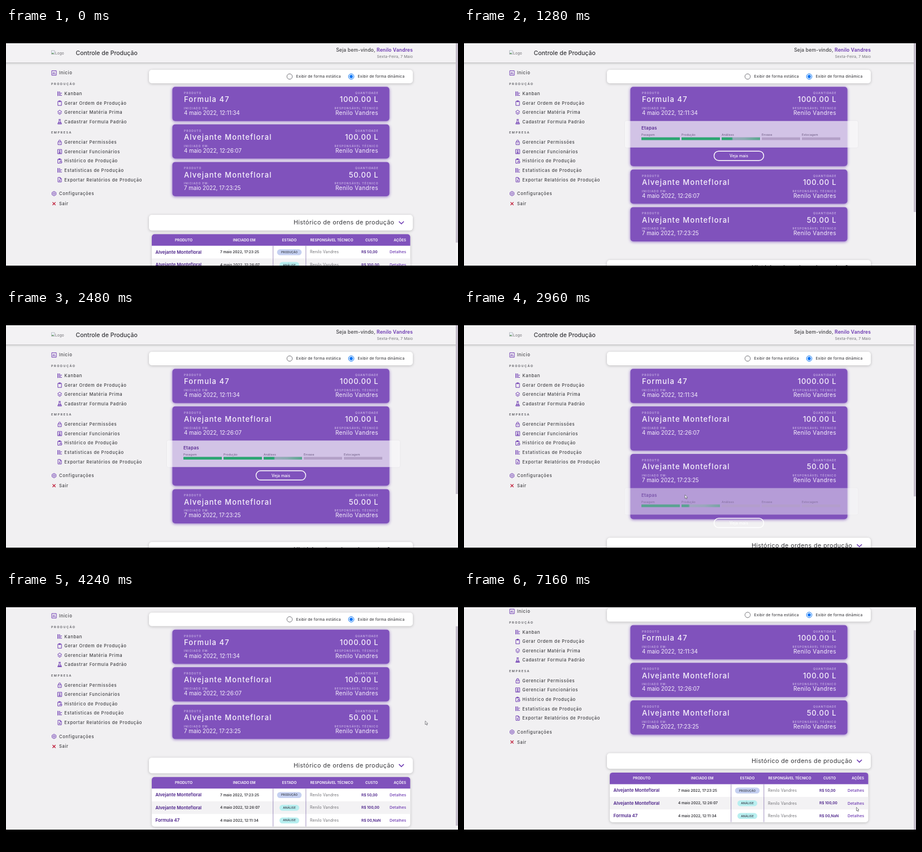
An HTML page with a canvas that plays this animation: 800x450 px, repeating every 7.2 s.

```html
<!DOCTYPE html>
<html lang="pt">
<head>
<meta charset="utf-8">
<title>Controle de Produção</title>
<style>
html, body { margin: 0; width: 100%; height: 100%; overflow: hidden; background: #000; }
canvas { display: block; width: 800px; height: 450px; }
</style>
</head>
<body>
<canvas id="stage" width="800" height="450"></canvas>
<script>
const ctx = document.getElementById('stage').getContext('2d');
const LOOP = 7200, TOP = 27, VIEW = 394, PAGE = 439.4;
const PURPLE = '#8052bc', INK = '#404044', ACCENT = '#6a35b0', BG = '#f1f0f2';
const CARD_H = 60.5, CARD_GAP = 6.1, GROW = 80, FADE = 400;
const PERSON = 'Renilo Vandres', MAIN = 'Alvejante Montefloral', OTHER = 'Formula 47';

// active: index of the step in progress; solid: its finished share
const cards = [
  { name: OTHER, qty: '1000.00 L', date: '4 maio 2022, 12:11:34', active: 2, solid: .26, hover: [[653, 1730]] },
  { name: MAIN, qty: '100.00 L', date: '4 maio 2022, 12:26:07', active: 2, solid: .26, hover: [[150, 610], [1752, 2770]] },
  { name: MAIN, qty: '50.00 L', date: '7 maio 2022, 17:23:25', active: 1, solid: .18, hover: [[2800, 3745]] }
];
const rows = [
  [MAIN, cards[2].date, 'PRODUÇÃO', 'R$ 50,00'],
  [MAIN, cards[1].date, 'ANÁLISE', 'R$ 100,00'],
  [OTHER, cards[0].date, 'ANÁLISE', 'R$ 00,NaN']
];
const steps = ['Pesagem', 'Produção', 'Análises', 'Envase', 'Estocagem'];
const menu = [
  ['home', 'Inicio', 81, 79.7], ['', 'PRODUÇÃO', 80, 99.3],
  ['list', 'Kanban', 91, 116.4], ['clip', 'Gerar Ordem de Produção', 91, 132.9],
  ['layers', 'Gerenciar Matéria Prima', 91, 149.5], ['flask', 'Cadastrar Formula Padrão', 91, 166],
  ['', 'EMPRESA', 80, 185.4],
  ['lock', 'Gerenciar Permissões', 91, 202.4], ['user', 'Gerenciar Funcionários', 91, 219],
  ['history', 'Histórico de Produção', 91, 235.6], ['list', 'Estatisticas de Produção', 91, 252.2],
  ['file', 'Exportar Relatórios de Produção', 91, 268.8],
  ['gear', 'Configurações', 81, 293.4], ['exit', 'Sair', 81, 311.2]
];
const pointer = [
  [2700, 402, 236], [2960, 391, 327.5], [3450, 400, 330], [3840, 742, 224.5],
  [4600, 742, 232], [5150, 500, 352], [5520, 472.5, 374.5], [6000, 480, 372],
  [6750, 702, 366], [7160, 694.5, 381.5]
];

const clamp = v => Math.max(0, Math.min(1, v));

// cubic-bezier(.25, .1, .25, 1)
function ease(p) {
  p = clamp(p);
  let lo = 0, hi = 1, u = p;
  for (let i = 0; i < 20; i++) {
    u = (lo + hi) / 2;
    const x = .75 * u * (1 - u) * (1 - u) + .75 * u * u * (1 - u) + u * u * u;
    if (x < p) lo = u; else hi = u;
  }
  return .3 * u * (1 - u) * (1 - u) + 3 * u * u * (1 - u) + u * u * u;
}

function openness(card, t) {
  let h = 0, on = false;
  for (const [a, b] of card.hover) {
    if (t < a) break;
    on = t < b;
    h = on ? ease((t - a) / FADE) : ease((b - a) / FADE) * (1 - ease((t - b) / FADE));
  }
  return { h, on };
}

function text(str, x, y, size, color, weight = 400, space = 0, align = 'left') {
  ctx.font = `${weight} ${size}px Inter, sans-serif`;
  ctx.letterSpacing = space + 'px';
  ctx.textAlign = align;
  ctx.fillStyle = color;
  ctx.fillText(str, x + (align === 'right' ? space : align === 'center' ? space / 2 : 0), y);
  return ctx.measureText(str).width;
}

function box(x, y, w, h, r, fill, shadow, blur = 4, dy = 1) {
  ctx.save();
  if (shadow) { ctx.shadowColor = shadow; ctx.shadowBlur = blur; ctx.shadowOffsetY = dy; }
  ctx.fillStyle = fill;
  ctx.beginPath();
  ctx.roundRect(x, y, w, h, r);
  ctx.fill();
  ctx.restore();
}

function stroke(path, color, width) {
  ctx.strokeStyle = color;
  ctx.lineWidth = width;
  ctx.stroke(new Path2D(path));
}

const glyphs = {
  home: 'M0 0H8V8H0ZM2.3 6V3.5M4 6V2M5.7 6V4.5',
  list: 'M.5 0V8M1.5 1H5M1.5 3H8M1.5 5H6M1.5 7H8',
  clip: 'M.8 1H7.2V8.3H.8ZM2.7 0H5.3V1.8H2.7Z',
  layers: 'M4 0L7.6 2.7L4 5.4L.4 2.7ZM.4 5L4 7.8L7.6 5',
  flask: 'M2.3 0H5.7M3 0V3L.5 8H7.5L5 3V0M2 5.5H6M1.5 7H6.5',
  lock: 'M1 3.3H7V8.3H1ZM2.2 3.3V2A1.8 1.8 0 0 1 5.8 2V3.3M4 5V6.5',
  user: 'M.4 .2H7.6V7.8H.4ZM2 6.3Q4 4.3 6 6.3ZM2.8 3A1.2 1.2 0 1 0 5.2 3A1.2 1.2 0 1 0 2.8 3',
  history: 'M4 8H.7V1H6.8V3.5M2.5 0H5V1.7H2.5ZM4 6A2 2 0 1 0 8 6A2 2 0 1 0 4 6M6 5V6H7',
  file: 'M1 0H5L7 2V8H1ZM4.7 0V2.3H7M4 3.5V6.5M2.7 5.3L4 6.5L5.3 5.3',
  gear: 'M4 0L7.5 2V6L4 8L.5 6V2ZM2.5 4A1.5 1.5 0 1 0 5.5 4A1.5 1.5 0 1 0 2.5 4',
  exit: 'M1.4 1.4L6.6 6.6M6.6 1.4L1.4 6.6'
};

function icon(name, x, cy) {
  ctx.save();
  ctx.translate(x, cy - 4);
  stroke(glyphs[name], name === 'exit' ? '#c0203c' : ACCENT, name === 'exit' ? 1.3 : .95);
  ctx.restore();
}

function drawHeader() {
  box(-5, 20, 810, 41, 0, '#f3f2f4', 'rgba(0,0,0,.28)', 4, 1);
  box(80, 39.5, 6.5, 7.5, .5, '#b9bcc2');
  box(81, 40.5, 4.5, 5.5, 0, '#eef3fa');
  box(81, 44, 3.5, 2, 0, '#79a878');
  text('Logo', 87, 46.7, 6.6, '#707074');
  text('Controle de Produção', 123.5, 47.8, 10.4, '#343438', 500, .05);
  const w = text(PERSON, 720, 42, 8.5, ACCENT, 600, .2, 'right');
  text('Seja bem-vindo,', 720 - w - 2.3, 42, 8.5, INK, 500, .2, 'right');
  text('Sexta-Feira, 7 Maio', 720, 53, 6.7, '#707076', 400, .13, 'right');
}

function drawMenu() {
  for (const [name, label, x, cy] of menu) {
    if (name) {
      icon(name, x, cy);
      text(label, x + (x > 85 ? 12.3 : 13), cy + 2.7, 7.6, INK, 500, .66);
    } else text(label, x, cy + 2, 5.4, '#58585e', 600, 1.6);
  }
}

function radio(x, label, on) {
  ctx.beginPath();
  ctx.arc(x, 86, 4.8, 0, 7);
  ctx.fillStyle = '#fff';
  ctx.fill();
  ctx.strokeStyle = on ? '#0a75f5' : '#77777c';
  ctx.lineWidth = 1;
  ctx.stroke();
  if (on) {
    ctx.beginPath();
    ctx.arc(x, 86, 2.9, 0, 7);
    ctx.fillStyle = '#0a75f5';
    ctx.fill();
  }
  text(label, x + 11.5, 88.4, 6.5, '#404044', 500, .25);
}

function drawCard(c, y, height) {
  const tag = '#c9b3e6', ink = '#f6f1fc';
  box(294.5, y, 384, height, 5, PURPLE, 'rgba(110,60,180,.75)', 5, 1);
  text('PRODUTO', 315, y + 13, 5, tag, 600, .95);
  text('QUANTIDADE', 658.5, y + 13, 5, tag, 600, .8, 'right');
  text(c.name, 315, y + 27.2, 13, ink, 500, 1.1);
  text(c.qty, 658.5, y + 27.2, 13, ink, 500, .8, 'right');
  text('INICIADO EM:', 315, y + 39.8, 5, tag, 600, .95);
  text('RESPONSÁVEL TÉCNICO', 658.5, y + 39.8, 5, tag, 600, .92, 'right');
  text(c.date, 315, y + 50, 9.7, ink);
  text(PERSON, 658.5, y + 50, 10, ink, 400, .4, 'right');
}

function drawSteps(c, y, h) {
  ctx.save();
  ctx.globalAlpha = clamp(h * 1.3 - .24);
  box(285, y + 60.5, 412, 47, 3, 'rgba(255,255,255,.66)', 'rgba(80,60,110,.1)', 3, 0);
  text('Etapas', 314, y + 75.8, 8, '#592c92', 600, .2);
  steps.forEach((label, i) => {
    const x = 314 + i * 71, by = y + 89.5;
    text(label, x, y + 86.7, 5.2, '#66557c', 400, .15);
    box(x, by, 68, 4.8, 0, '#b3a0c7');
    if (i < c.active) box(x, by, 68, 4.8, 0, '#2ba672');
    if (i === c.active) {
      const g = ctx.createLinearGradient(x, 0, x + 68, 0);
      g.addColorStop(0, '#2ba672');
      g.addColorStop(c.solid, '#2ba672');
      g.addColorStop(c.solid + .04, '#9aaabd');
      g.addColorStop(.6, '#8cacb2');
      g.addColorStop(1, '#55a98c');
      box(x, by, 68, 4.8, 0, g);
    }
  });
  ctx.globalAlpha = clamp(h * 3);
  ctx.beginPath();
  ctx.roundRect(442.5, y + 114, 88, 16.5, 8.2);
  ctx.strokeStyle = '#fff';
  ctx.lineWidth = 1.4;
  ctx.stroke();
  text('Veja mais', 486.5, y + 124.8, 7, '#fff', 500, .1, 'center');
  ctx.restore();
}

function drawHistory(dy) {
  ctx.save();
  ctx.translate(0, dy);
  box(253, 331, 467, 27.7, 5, '#fff', 'rgba(0,0,0,.22)', 5, 1);
  text('Histórico de ordens de produção', 687, 348.3, 10.7, '#38383c', 400, .4, 'right');
  stroke('M695.5 342.7L699.8 347L704.1 342.7', ACCENT, 1.5);

  box(258, 365.3, 457.5, 88, 5, '#fff', 'rgba(0,0,0,.22)', 5, 1);
  box(258, 365.3, 457.5, 20.5, [5, 5, 0, 0], PURPLE);
  const heads = [['PRODUTO', 314.5], ['INICIADO EM', 421.7], ['ESTADO', 501.5],
    ['RESPONSÁVEL TÉCNICO', 576.5], ['CUSTO', 647], ['AÇÕES', 697.2]];
  for (const [label, x] of heads) text(label, x, 377.8, 6.3, '#fff', 600, 0, 'center');

  rows.forEach(([name, date, state, cost], i) => {
    const cy = 397 + i * 22.5, made = state === 'PRODUÇÃO', w = made ? 43.5 : 35;
    if (i === 1) box(258, cy - 11.2, 457.5, 22.4, 0, '#f3f2f4');
    text(name, 264.5, cy + 2.7, 7.9, '#4b2189', 600);
    text(date, 379, cy + 2.3, 6.5, '#37373c', 600);
    box(501.5 - w / 2, cy - 5, w, 10.5, 5.2, made ? '#c5d0f1' : '#b8eff0');
    text(state, 501.5, cy + 2, 4.9, '#414551', 600, .2, 'center');
    text(PERSON, 538, cy + 2.4, 7, '#737378', 400, .12);
    text(cost, 629, cy + 2.3, 6.5, '#4b2189', 600);
    text('Detalhes', 679, cy + 2.4, 6.8, ACCENT, 500, .1);
  });
  stroke('M472.7 386V453M530.8 386V453', '#8a77b0', .8);
  ctx.restore();
}

function drawPointer(t) {
  if (t < pointer[0][0]) return;
  let i = 0;
  while (i < pointer.length - 2 && t > pointer[i + 1][0]) i++;
  const [a, ax, ay] = pointer[i], [b, bx, by] = pointer[i + 1];
  const p = clamp((t - a) / (b - a)), k = p * p * (3 - 2 * p);
  ctx.save();
  ctx.translate(ax + (bx - ax) * k, ay + (by - ay) * k);
  const arrow = new Path2D('M0 0V6.3L1.5 5L2.6 7.3L3.7 6.8L2.7 4.5H4.6Z');
  ctx.fillStyle = '#fff';
  ctx.fill(arrow);
  ctx.strokeStyle = '#55555c';
  ctx.lineWidth = .7;
  ctx.stroke(arrow);
  ctx.restore();
}

function draw(t) {
  const states = cards.map(c => openness(c, t));
  const growth = states.reduce((sum, s) => sum + s.h * GROW, 0);
  const scroll = (PAGE - VIEW) * ease((t - 4020) / 420);

  ctx.fillStyle = '#000';
  ctx.fillRect(0, 0, 800, 450);
  ctx.save();
  ctx.beginPath();
  ctx.rect(0, TOP, 800, VIEW);
  ctx.clip();
  ctx.fillStyle = BG;
  ctx.fillRect(0, TOP, 800, VIEW);

  ctx.save();
  ctx.translate(0, -scroll);
  drawHeader();
  drawMenu();
  box(253, 74, 467, 24, 5, '#fff', 'rgba(0,0,0,.22)', 5, 1);
  radio(502, 'Exibir de forma estática', false);
  radio(611, 'Exibir de forma dinâmica', true);
  drawHistory(growth);
  let y = 104.2;
  cards.forEach((c, i) => {
    const s = states[i], height = CARD_H + s.h * GROW;
    s.y = y;
    drawCard(c, y, height);
    y += height + CARD_GAP;
  });
  cards.forEach((c, i) => {
    if (states[i].on) drawSteps(c, states[i].y, states[i].h);
  });
  ctx.restore();

  const ratio = VIEW / (PAGE + growth);
  box(796, TOP, 4, VIEW, 0, '#f4f3f5');
  box(796, TOP + scroll * ratio, 4, VIEW * ratio, 0, '#c4bdca');
  drawPointer(t);
  ctx.restore();
}

const start = performance.now();
function tick() {
  draw((performance.now() - start) % LOOP);
  requestAnimationFrame(tick);
}
tick();
</script>
</body>
</html>
```
